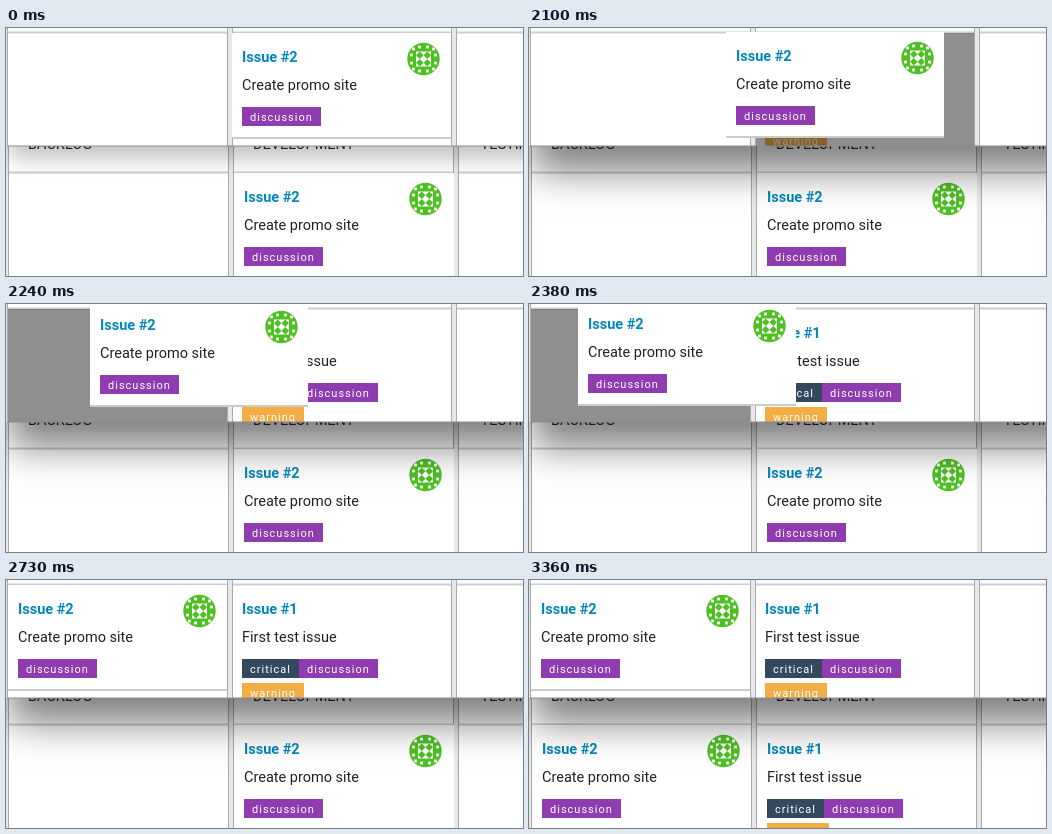
Write an HTML page with a canvas that moves like this. It is 517 by 248 pixels and loops after 3500 ms.

```html
<!DOCTYPE html>
<html lang="en">
<head>
<meta charset="utf-8">
<title>Synced boards</title>
<style>
html, body { margin: 0; width: 100%; height: 100%; overflow: hidden; background: #fff; }
canvas { display: block; width: 517px; height: 248px; }
</style>
</head>
<body>
<canvas id="stage" width="517" height="248"></canvas>
<script>
const W = 517, H = 248, SPLIT = 118, LOOP = 3500;
const FOCUS = 910, DRAG = 2100, STEP = 70, DROP = 2730, SYNC = 3290;
const ctx = document.getElementById('stage').getContext('2d');

const INK = '#222', LINK = '#0086ba', GREEN = '#4fc024';
const TAGS = { critical: '#34495e', discussion: '#8e3cb0', warning: '#f2ad45' };

// Offset of the dragged card at each step
const PATH = [[-29, -1], [-108, -7], [-142, -8], [-163, -9],
              [-177, -9], [-186, -9], [-192, -9], [-195, -9]];

// Each column is [left, right]
const TOP = { y: 0, cols: [[2, 221], [227, 445], [451, 670]], text: [12, 236] };
const BOTTOM = { y: 140, cols: [[3, 222], [228, 447], [453, 672]], text: [13, 238] };

function rect(x, y, w, h, color) {
  ctx.fillStyle = color;
  ctx.fillRect(x, y, w, h);
}

function text(str, x, y, color, font, spacing = 0) {
  ctx.font = font + ' Roboto, sans-serif';
  ctx.letterSpacing = spacing + 'px';
  ctx.fillStyle = color;
  ctx.fillText(str, x, y);
  ctx.letterSpacing = '0px';
}

function clipped(x, y, w, h, draw) {
  ctx.save();
  ctx.beginPath();
  ctx.rect(x, y, w, h);
  ctx.clip();
  draw();
  ctx.restore();
}

function tag(name, x, y, w) {
  rect(x, y, w, 19, TAGS[name]);
  text(name, x + 8, y + 13.5, '#fff', '11px', 1);
}

function diamond(x, y, r) {
  ctx.beginPath();
  ctx.moveTo(x, y - r);
  ctx.lineTo(x + r, y);
  ctx.lineTo(x, y + r);
  ctx.lineTo(x - r, y);
  ctx.fill();
}

function avatar(x, y) {
  ctx.fillStyle = GREEN;
  ctx.beginPath();
  ctx.arc(x, y, 16.2, 0, Math.PI * 2);
  ctx.fill();
  rect(x - 7.5, y - 7.5, 15, 15, '#fff');
  for (const sx of [-1, 1]) for (const sy of [-1, 1]) {
    ctx.fillStyle = GREEN;
    diamond(x + sx * 3.75, y + sy * 3.75, 3.75);
    for (const [dx, dy] of [[4, 12], [12, 4], [10, 10]]) {
      rect(x + sx * dx - 1.4, y + sy * dy - 1.4, 2.8, 2.8, '#fff');
    }
  }
}

function heading(title, body, x, y) {
  text(title, x, y + 33.5, LINK, 'bold 14.5px');
  text(body, x, y + 62, INK, '14.5px');
}

function promoCard(x, y, w) {
  rect(x - 10, y + 5, w, 104, '#fff');
  rect(x - 10, y + 109, w, 2, '#cbcbcb');
  heading('Issue #2', 'Create promo site', x, y);
  avatar(x + 181.5, y + 31);
  tag('discussion', x, y + 79, 79);
}

function testCard(x, y) {
  heading('Issue #1', 'First test issue', x, y);
  tag('critical', x, y + 79, 57);
  tag('discussion', x + 57, y + 79, 79);
  tag('warning', x, y + 103, 62);
}

function columns({ y, cols }) {
  const from = y ? SPLIT : 0, h = H;
  rect(0, from, W, h, '#e8e8e8');
  for (const [l, r] of cols) {
    rect(l - 1, from, r - l + 2, h, '#a9a9a9');
    rect(l, from, r - l, h, '#fff');
    rect(l, y + 3.5, r - l, 2, '#cccccc');
  }
}

// Promo card sits in the backlog once moved, otherwise above the test card
function cards(board, moved) {
  const [left, right] = board.text;
  const col = board.cols[moved ? 0 : 1];
  promoCard(moved ? left : right, board.y, col[1] - col[0] + (moved ? 0 : 1));
  if (moved) testCard(right, board.y);
}

function dragging(t) {
  const k = Math.min(PATH.length - 1, Math.floor((t - DRAG) / STEP));
  const [dx, dy] = PATH[k];
  testCard(TOP.text[1], 0);
  const [l, r] = TOP.cols[k ? 0 : 1];
  rect(l, 5, r - l, SPLIT, 'rgba(0,0,0,0.44)');
  promoCard(TOP.text[1] + dx, dy, 218);
}

function windowShadow(edge, sigma, alpha) {
  const away = 2000;
  ctx.save();
  ctx.shadowColor = `rgba(0,0,0,${alpha})`;
  ctx.shadowBlur = sigma * 2;
  ctx.shadowOffsetX = away;
  rect(4 - away, -200, 900, 200 + edge, '#000');
  ctx.restore();
}

function draw(t) {
  clipped(0, SPLIT, W, H - SPLIT, () => {
    columns(BOTTOM);
    text('BACKLOG', 22, 121, INK, '14.5px');
    text('DEVELOPMENT', 247, 121, INK, '14.5px');
    text('TESTING', 474.5, 121, INK, '14.5px');
    cards(BOTTOM, t >= SYNC);
    if (t < FOCUS) windowShadow(131, 10, 0.24);
    else windowShadow(143, 18, 0.5);
  });
  clipped(0, 0, W, SPLIT, () => {
    columns(TOP);
    if (t >= DRAG && t < DROP) dragging(t);
    else cards(TOP, t >= DROP);
  });
  rect(1, SPLIT - 0.5, W, 1, '#8c8c8c');
}

const start = performance.now();
function frame() {
  draw((performance.now() - start) % LOOP);
  requestAnimationFrame(frame);
}
frame();
</script>
</body>
</html>
```
